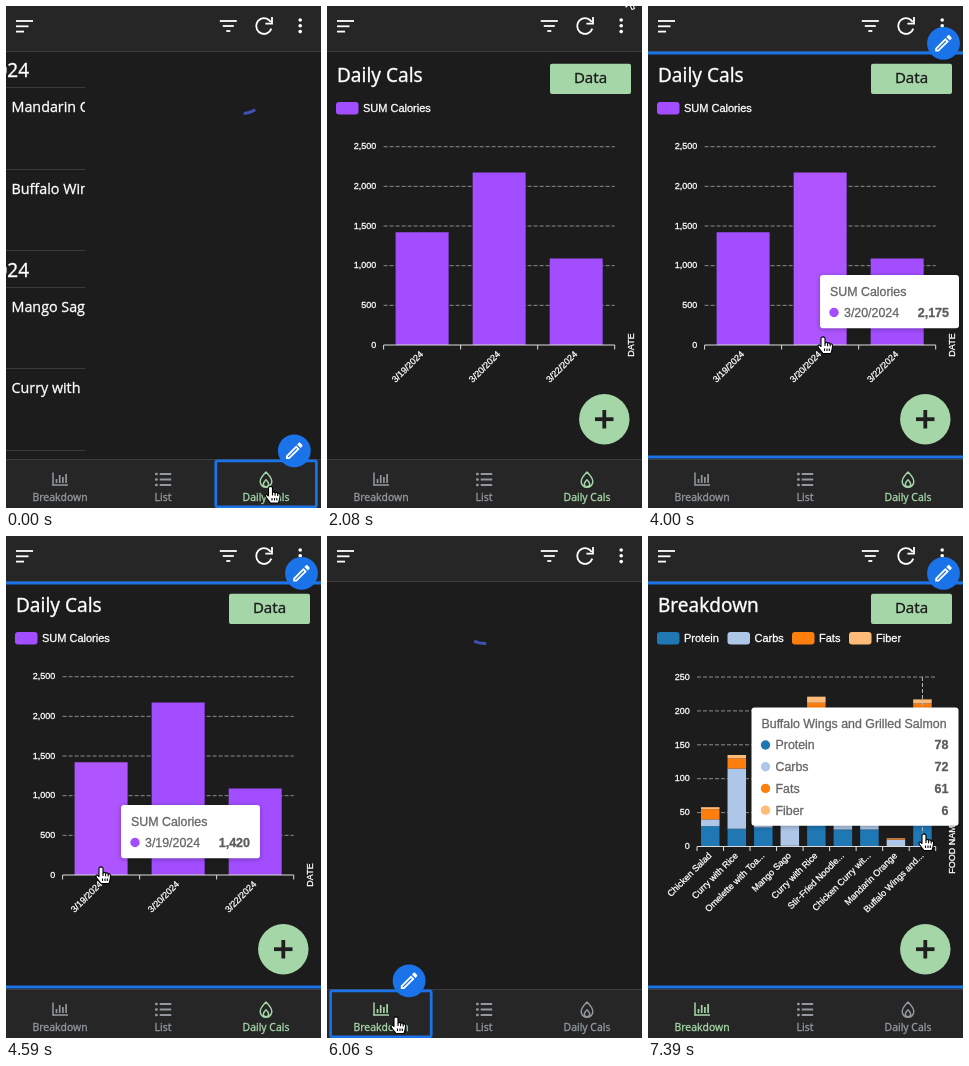
Animation of 315 by 502 pixels, one loop 8000 ms. Source, as an HTML page with a canvas:

```html
<!DOCTYPE html>
<html lang="en">
<head>
<meta charset="utf-8">
<style>
html, body { margin: 0; height: 100%; overflow: hidden; background: #1c1c1c; }
canvas { display: block; width: 315px; height: 502px; }
</style>
</head>
<body>
<canvas id="stage" width="315" height="502"></canvas>
<script>
const ctx = document.getElementById('stage').getContext('2d');
const NOTO = '"Noto Sans", sans-serif', OPEN = '"Open Sans", sans-serif';
const SANS = '"Liberation Sans", Arial, sans-serif';
const BLUE = '#1a73e8', GREEN = '#a5d6a7', GREY = '#92989d', PURPLE = '#a24dff';
const LOOP = 8000;

const PENCIL = new Path2D('M14.06 9.02l.92.92L5.92 19H5v-.92l9.06-9.06M17.66 3c-.25 0-.51.1-.7.29l-1.83 1.83 3.75 3.75 1.83-1.83c.39-.39.39-1.02 0-1.41l-2.34-2.34c-.2-.2-.45-.29-.71-.29zm-3.6 3.19L3 17.25V21h3.75L17.81 9.94l-3.75-3.75z');
const HAND = new Path2D('M-2 1Q0-1.2 2 1V6Q3.3 4.8 4.6 6.2Q6.2 5.2 7.2 7Q9.4 6.4 9.6 8.8L9 13L8 16.5H0L-4.2 11Q-6 8 -4 7.8L-2 9.5Z');
const FINGERS = new Path2D('M2 6V9M4.6 6.2V9.2M7.2 7V9.6M1.5 11.5V14M4 11.5V14M6.3 11.5V14');
const ARROW = new Path2D('M0 0V15L3.5 11.8L6 17.5L8.5 16.4L6 10.9H11Z');
const DROP = new Path2D('M0-7.5C3-4.5 5.8-1.5 5.8 2A5.8 5.8 0 0 1-5.8 2C-5.8-1.5-3-4.5 0-7.5ZM0 .2C1.6 1.8 2.7 3 2.7 4.6A2.7 2.7 0 0 1-2.7 4.6C-2.7 3-1.6 1.8 0 .2Z');

const CHARTS = {
  daily: {
    title: 'Daily Cals', axis: 'DATE', left: 56.6, top: 140.7, base: 339, max: 2500, step: 500, barWidth: 53,
    names: ['3/19/2024', '3/20/2024', '3/22/2024'],
    bars: [[1420], [2175], [1090]],
    legend: [['SUM Calories', 9, PURPLE]]
  },
  food: {
    title: 'Breakdown', axis: 'FOOD NAME', left: 49, top: 141, base: 310.5, max: 250, step: 50, barWidth: 18.5,
    names: ['Chicken Salad', 'Curry with Rice', 'Omelette with Toa...', 'Mango Sago', 'Curry with Rice',
      'Stir-Fried Noodle...', 'Chicken Curry wit...', 'Mandarin Orange', 'Buffalo Wings and...'],
    bars: [[30, 10, 15, 3], [26, 89, 15, 5], [28, 45, 27, 5], [1, 60, 0, 2], [35, 155, 22, 9],
      [25, 59, 9, 4], [25, 85, 15, 5], [0, 10, 1, 1], [78, 72, 61, 6]],
    legend: [['Protein', 9, '#1f77b4'], ['Carbs', 79.5, '#aec7e8'], ['Fats', 144, '#ff7f0e'], ['Fiber', 201, '#ffbb78']]
  }
};

// Each step: time, cursor kind, x, y, and the properties that change from then on.
const STEPS = [
  [0, HAND, 264.5, 480.5, { tab: 2, hover: 2, view: 'daily', from: 'list', shift: -236, grow: 0, hot: -1, tipAlpha: 0 }],
  [150, HAND, 264.5, 480.5, { from: '', shift: 0 }],
  [440, HAND, 264.5, 480.5, { grow: .7 }],
  [590, HAND, 264.5, 480.5, { grow: 1 }],
  [2080, ARROW, 299, -14, { hover: -1 }],
  [2220, null, 0, 0, {}],
  [2520, HAND, 287, 490, { hover: 2 }],
  [2670, HAND, 274, 462, {}],
  [2810, HAND, 263, 410, { hover: 3 }],
  [2960, ARROW, 252, 362, {}],
  [3110, ARROW, 245, 335, {}],
  [3710, HAND, 230, 333, { hot: 2, tipAlpha: .6, tipX: 172 }],
  [3860, HAND, 194, 332, { hot: 1, tipAlpha: 1 }],
  [4000, HAND, 175, 331, {}],
  [4150, HAND, 152, 331, {}],
  [4300, HAND, 116, 331, { hot: 0, tipX: 146 }],
  [4440, HAND, 99, 331, { tipX: 124 }],
  [4590, HAND, 95, 331, { tipX: 115 }],
  [5030, ARROW, 85, 390, { hot: -1, tipAlpha: 0 }],
  [5180, HAND, 76, 464, { hover: 0 }],
  [5320, HAND, 74, 480, {}],
  [5470, HAND, 70, 481, {}],
  [5910, HAND, 69, 481, { tab: 0, view: 'food', from: 'daily', shift: 236, grow: 0 }],
  [6060, HAND, 69, 481, { from: '', shift: 0 }],
  [6200, HAND, 69, 481, { grow: .7 }],
  [6350, HAND, 69, 481, { grow: 1 }],
  [6500, HAND, 92, 462, {}],
  [6650, ARROW, 165, 400, { hover: 3 }],
  [6790, ARROW, 235, 350, {}],
  [6940, ARROW, 270, 313, {}],
  [7090, HAND, 275, 305, { hot: 8, tipAlpha: .5 }],
  [7240, HAND, 275, 300, { tipAlpha: 1 }],
  [7390, HAND, 276, 298, {}]
];

function stateAt(t) {
  const state = {};
  for (const [time, cursor, x, y, change] of STEPS)
    if (time <= t) Object.assign(state, { cursor, x, y }, change);
  return state;
}

function rect(x, y, w, h, color, r = 0) {
  ctx.fillStyle = color;
  ctx.beginPath();
  ctx.roundRect(x, y, w, h, r);
  ctx.fill();
}

function circle(x, y, r, color) {
  ctx.fillStyle = color;
  ctx.beginPath();
  ctx.arc(x, y, r, 0, 7);
  ctx.fill();
}

function line(x1, y1, x2, y2, color, width = 1, dash = []) {
  ctx.strokeStyle = color;
  ctx.lineWidth = width;
  ctx.setLineDash(dash);
  ctx.beginPath();
  ctx.moveTo(x1, y1);
  ctx.lineTo(x2, y2);
  ctx.stroke();
  ctx.setLineDash([]);
}

// A hairline stroke gives the slightly heavy look of smoothed type.
function text(str, x, y, font, color = '#fff', align = 'left', baseline = 'alphabetic') {
  ctx.font = font;
  ctx.fillStyle = ctx.strokeStyle = color;
  ctx.lineWidth = .3;
  ctx.lineJoin = 'round';
  ctx.textAlign = align;
  ctx.textBaseline = baseline;
  ctx.fillText(str, x, y);
  ctx.strokeText(str, x, y);
}

function at(x, y, draw, angle = 0, scale = 1) {
  ctx.save();
  ctx.translate(x, y);
  ctx.rotate(angle);
  ctx.scale(scale, scale);
  draw();
  ctx.restore();
}

function list() {
  const rule = y => line(0, Math.floor(y) + .5, 315, Math.floor(y) + .5, '#3a3a3a');
  for (const [y, items] of [[71, ['Mandarin Orange', 'Buffalo Wings and']], [270.6, ['Mango Sago', 'Curry with Rice']]]) {
    text('3/20/2024', 259, y, '19px ' + NOTO, '#fff', 'right');
    rule(y + 10.5);
    items.forEach((name, i) => {
      text(name, 241.5, y + 35.2 + i * 81.4, '500 14.3px ' + OPEN);
      rule(y + 92 + i * 81.4);
    });
  }
}

function spinner(t) {
  const start = 1 + t / 300;
  ctx.strokeStyle = '#3f51b5';
  ctx.lineWidth = 3;
  ctx.beginPath();
  ctx.arc(157.5, 84, 23.5, start, start + .52);
  ctx.stroke();
}

function chart(c, grow, hot) {
  const { left, base, top } = c, right = 287.7, slot = (right - left) / c.bars.length;
  const scale = (base - top) / c.max;

  text(c.title, 10, 76, '19px ' + NOTO);
  rect(223, 57.7, 81, 30.2, GREEN, 2);
  text('Data', 263.5, 77, '15px ' + NOTO, '#1c1c1c', 'center');
  for (const [name, x, color] of c.legend) {
    rect(x, 96, 22.5, 12.5, color, 3);
    text(name, x + 27, 106, '11px ' + SANS);
  }

  for (let v = 0; v <= c.max; v += c.step) {
    const y = base - v * scale;
    if (v) line(left, y, right, y, '#8c8c8c', 1, [4, 2]);
    text(v.toLocaleString('en-US'), left - 7.3, y + .3, '9px ' + SANS, '#fff', 'right', 'middle');
  }

  c.bars.forEach((bar, i) => {
    const mid = left + slot * (i + .5);
    let y = base;
    bar.forEach((v, k) => {
      const h = v * scale * grow;
      y -= h;
      const color = i === hot && bar.length === 1 ? '#ae55ff' : c.legend[k][2];
      rect(mid - c.barWidth / 2, y, c.barWidth, h, color);
    });
    if (i === hot && bar.length > 1) line(mid, top, mid, base, '#bbb', 1, [4, 2]);
    at(mid, base + 8, () => text(c.names[i], 0, 0, '9px ' + SANS, '#fff', 'right', 'middle'), -Math.PI / 4);
  });

  line(left, base, right, base, '#ddd');
  for (let i = 0; i <= c.bars.length; i++) line(left + i * slot, base, left + i * slot, base + 4.5, '#ddd');
  at(305, base, () => text(c.axis, 0, 0, '9px ' + SANS, '#fff', 'center', 'middle'), -Math.PI / 2);
}

function tooltip(x, y, w, title, rows) {
  ctx.save();
  ctx.shadowColor = 'rgba(0,0,0,.3)';
  ctx.shadowBlur = 5;
  ctx.shadowOffsetY = 1;
  rect(x, y, w, 31.5 + rows.length * 21.7, '#fff', 3);
  ctx.restore();
  text(title, x + 10, y + 20.5, '12.4px ' + SANS, '#666');
  rows.forEach(([color, name, value], i) => {
    const rowY = y + 37.5 + i * 21.7;
    circle(x + 14, rowY, 4.7, color);
    text(name, x + 24, rowY + 4.4, '12.4px ' + SANS, '#666');
    text(value.toLocaleString('en-US'), x + w - 10, rowY + 4.4, 'bold 12.5px ' + SANS, '#5c5c5c', 'right');
  });
}

function showTip(s) {
  const c = CHARTS[s.view], bar = c.bars[s.hot];
  ctx.globalAlpha = s.tipAlpha;
  if (s.view === 'daily') tooltip(s.tipX, 269, 139, 'SUM Calories', [[PURPLE, c.names[s.hot], bar[0]]]);
  else tooltip(103.5, 171.5, 207, 'Buffalo Wings and Grilled Salmon', bar.map((v, k) => [c.legend[k][2], c.legend[k][0], v]));
  ctx.globalAlpha = 1;
}

function addButton() {
  circle(277.3, 413.2, 25.2, GREEN);
  line(268, 413.2, 286.5, 413.2, '#1f1f1f', 3.8);
  line(277.3, 404, 277.3, 422.5, '#1f1f1f', 3.8);
}

function header() {
  rect(0, 0, 315, 45, '#262626');
  line(0, 45.5, 315, 45.5, '#3e3e3e');
  [17, 12.5, 8].forEach((w, i) => line(10, 15 + i * 5.3, 10 + w, 15 + i * 5.3, '#fff', 1.8));
  [8.5, 5.5, 2].forEach((w, i) => line(222.3 - w, 15 + i * 5, 222.3 + w, 15 + i * 5, '#fff', 1.8));
  ctx.strokeStyle = '#fff';
  ctx.lineWidth = 1.8;
  ctx.lineJoin = 'miter';
  ctx.beginPath();
  ctx.arc(258, 20, 7.8, .35, 5.75);
  ctx.stroke();
  ctx.stroke(new Path2D('M266 11V17.6H259.4'));
  for (const y of [14, 19.8, 25.6]) circle(294.2, y, 1.8, '#fff');
}

function nav(active) {
  rect(0, 453, 315, 49, '#262626');
  line(0, 453.5, 315, 453.5, '#3e3e3e');
  ['Breakdown', 'List', 'Daily Cals'].forEach((name, i) => {
    const color = i === active ? GREEN : GREY;
    at([54, 157, 260][i], 473.5, () => {
      text(name, 0, 21.5, '10.4px ' + NOTO, color, 'center');
      if (i === 0) {
        line(-7, -7, -7, 6, color, 1.5);
        line(-7.6, 5.5, 8, 5.5, color, 1.5);
        [4, 8, 6, 9].forEach((h, k) => line(-3.5 + k * 3.2, 3.5, -3.5 + k * 3.2, 3.5 - h, color, 1.7));
      } else if (i === 1) {
        for (const y of [-5.5, 0, 5.5]) {
          rect(-8, y - 1.3, 2.8, 2.6, color, 1);
          line(-3.3, y, 8.2, y, color, 2);
        }
      } else {
        ctx.strokeStyle = color;
        ctx.lineWidth = 1.5;
        ctx.stroke(DROP);
      }
    });
  });
}

function highlight(hover) {
  if (hover < 0) return;
  let x = 295.5, y = 37.3;
  if (hover === 3) {
    line(0, 47, 315, 47, BLUE, 2.8);
    line(0, 451, 315, 451, BLUE, 2.8);
  } else {
    const left = 3.6 + hover * 103.1;
    ctx.strokeStyle = BLUE;
    ctx.lineWidth = 2.7;
    ctx.beginPath();
    ctx.roundRect(left, 454.8, 100.6, 46, 1.5);
    ctx.stroke();
    x = left + 78.5;
    y = 444.8;
  }
  circle(x, y, 16.4, BLUE);
  at(x, y, () => {
    ctx.translate(-12, -12);
    ctx.fillStyle = '#fff';
    ctx.fill(PENCIL);
  }, 0, .92);
}

function pointer({ cursor, x, y }) {
  if (!cursor) return;
  const hand = cursor === HAND;
  at(x, y, () => {
    ctx.lineWidth = 1.1;
    ctx.lineJoin = 'round';
    ctx.fillStyle = hand ? '#fff' : '#000';
    ctx.strokeStyle = hand ? '#000' : '#fff';
    ctx.fill(cursor);
    ctx.stroke(cursor);
    if (hand) ctx.stroke(FINGERS);
  });
}

function draw(t) {
  const s = stateAt(t);
  rect(0, 0, 315, 502, '#1c1c1c');

  if (s.from) at(s.shift, 0, () => s.from === 'list' ? list() : chart(CHARTS[s.from], 1, -1));
  if (s.grow) {
    chart(CHARTS[s.view], s.grow, s.hot);
    addButton();
  } else {
    const x = s.shift ? s.shift - Math.sign(s.shift) * 315 : 0;
    at(x, 0, () => {
      rect(0, 46, 315, 407, '#1c1c1c');
      spinner(s.shift ? 0 : 150);
    });
  }
  header();
  nav(s.tab);
  if (s.hot >= 0) showTip(s);
  highlight(s.hover);
  pointer(s);
}

function frame() {
  draw(performance.now() % LOOP);
  requestAnimationFrame(frame);
}
frame();
</script>
</body>
</html>
```
